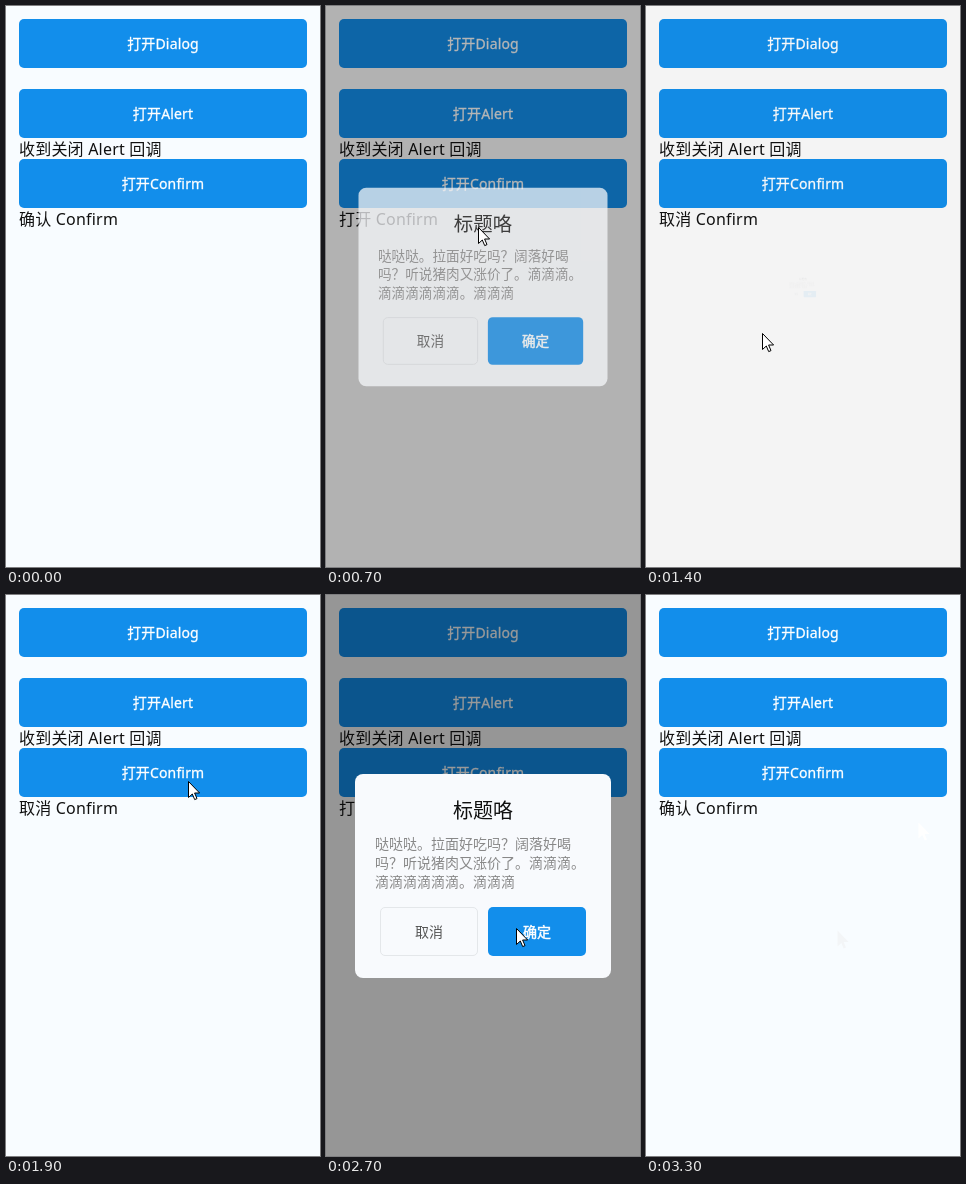
Animation of 314x561 px, one loop 3900 ms. Source, as an HTML page:

```html
<!DOCTYPE html>
<html lang="zh-CN">
<head>
<meta charset="utf-8">
<title>Dialog</title>
<style>
  html, body { margin: 0; width: 100%; height: 100%; overflow: hidden; }
  body {
    position: relative; background: #f8fcff; color: #111;
    font: 16px/21px "Noto Sans", "Noto Sans CJK SC", "Noto Sans CJK", sans-serif;
    white-space: nowrap;
  }
  div, svg { position: absolute; box-sizing: border-box; }
  .btn {
    width: 288px; height: 49px; left: 13px; border-radius: 5px;
    background: #128eeb; color: #fff;
    font-size: 14px; line-height: 49px; text-align: center;
    letter-spacing: .15px; -webkit-text-stroke: .3px;
  }
  .btn.down { background: #1d7fc8; color: rgba(255, 255, 255, .4); }
  .note { left: 13px; letter-spacing: .2px; }
  #mask { inset: 0; background: rgba(0, 0, 0, .4); }
  #dialog {
    left: 29px; top: 179px; width: 256px; height: 204px;
    border-radius: 8px; background: #f8fafd;
  }
  #title { width: 100%; top: 23px; font-size: 20px; line-height: 28px; text-align: center; }
  #text { left: 20px; top: 60px; font-size: 14px; line-height: 19px; color: #888; }
  #dialog .btn { top: 133px; width: 98px; letter-spacing: 0; }
  #dialog .cancel {
    background: none; border: 1px solid #e4e7ea; color: #555;
    line-height: 47px; -webkit-text-stroke: 0;
  }
  svg { left: 0; top: 0; overflow: visible; }
</style>
</head>
<body>
  <div class="btn" style="top:13px">打开Dialog</div>
  <div class="btn" style="top:83px">打开Alert</div>
  <div class="note" style="top:133px">收到关闭 Alert 回调</div>
  <div class="btn" id="open" style="top:153px">打开Confirm</div>
  <div class="note" id="state" style="top:203px"></div>
  <div id="mask"></div>
  <div id="dialog">
    <div id="title">标题咯</div>
    <div id="text">哒哒哒。拉面好吃吗？阔落好喝<br>吗？听说猪肉又涨价了。滴滴滴。<br>滴滴滴滴滴滴。滴滴滴</div>
    <div class="btn cancel" style="left:25px">取消</div>
    <div class="btn" style="left:133px;-webkit-text-stroke-width:.5px">确定</div>
  </div>
  <svg width="12" height="20">
    <defs><path id="arrow" d="M.5 .5V16.5L4.3 13 6.7 18.6 9 17.6 6.6 12H11.6Z"/></defs>
    <use id="cursor" href="#arrow" fill="#fff" stroke="#000"/>
    <g id="trail">
      <use href="#arrow" x="272" y="227" fill="#fff"/>
      <use href="#arrow" x="191" y="335" fill="#f3f5f7"/>
    </g>
  </svg>
<script>
const LOOP = 3900, STEP = 100, FADE = 300;
const $ = id => document.getElementById(id);

// time, x, y of the pointer tip
const path = [
  [100, 170, 177], [300, 165, 185], [600, 165, 185], [1000, 113, 330],
  [1100, 113, 331], [1300, 113, 331], [1400, 116, 327], [1800, 181, 187],
  [1900, 182, 186], [2300, 182, 186], [2700, 190, 333], [2900, 190, 333],
  [3200, 272, 227]
];

// Opening and closing times, with the progress reached at the first step
const runs = [
  { open: 500, start: .06, close: 1300, result: '取消' },
  { open: 2200, start: .55, close: 2900, result: '确认' }
];

function pointer(t) {
  const i = path.findIndex(k => k[0] >= t);
  if (i < 0 || t < path[0][0]) return null;
  const b = path[i], a = path[i - 1] || b;
  const f = a === b ? 0 : (t - a[0]) / (b[0] - a[0]);
  return [1, 2].map(n => Math.round(a[n] + (b[n] - a[n]) * f));
}

function popup(t, run) {
  if (!run) return { alpha: 0, scale: 0 };
  if (t < run.close) {
    const p = Math.min(1, run.start + (t - run.open) / FADE);
    return { alpha: p, scale: p < .5 ? 1.05 - .2 * p : .9 + .1 * p };
  }
  const left = Math.max(0, .46 - (t - run.close) / FADE);
  return { alpha: left ** 1.35, scale: left };
}

function draw(now) {
  const t = Math.floor(now % LOOP / STEP) * STEP;
  const run = runs.filter(r => t >= r.open).pop();
  const { alpha, scale } = popup(t, run);
  const tip = pointer(t);

  document.body.style.background = alpha ? '#fafafa' : '#f8fcff';
  $('mask').style.opacity = alpha;
  $('dialog').style.opacity = alpha;
  $('dialog').style.transform = scale === 1 ? 'none' : `scale(${scale})`;
  $('open').classList.toggle('down', !!run && t - run.open < 200);
  $('state').textContent = (!run ? '确认' : t < run.close ? '打开' : run.result) + ' Confirm';

  $('cursor').style.display = tip ? '' : 'none';
  if (tip) $('cursor').setAttribute('transform', `translate(${tip})`);
  $('trail').style.display = t >= 3300 ? '' : 'none';
}

const begin = performance.now();
function tick() {
  draw(performance.now() - begin);
  requestAnimationFrame(tick);
}
tick();
</script>
</body>
</html>
```
